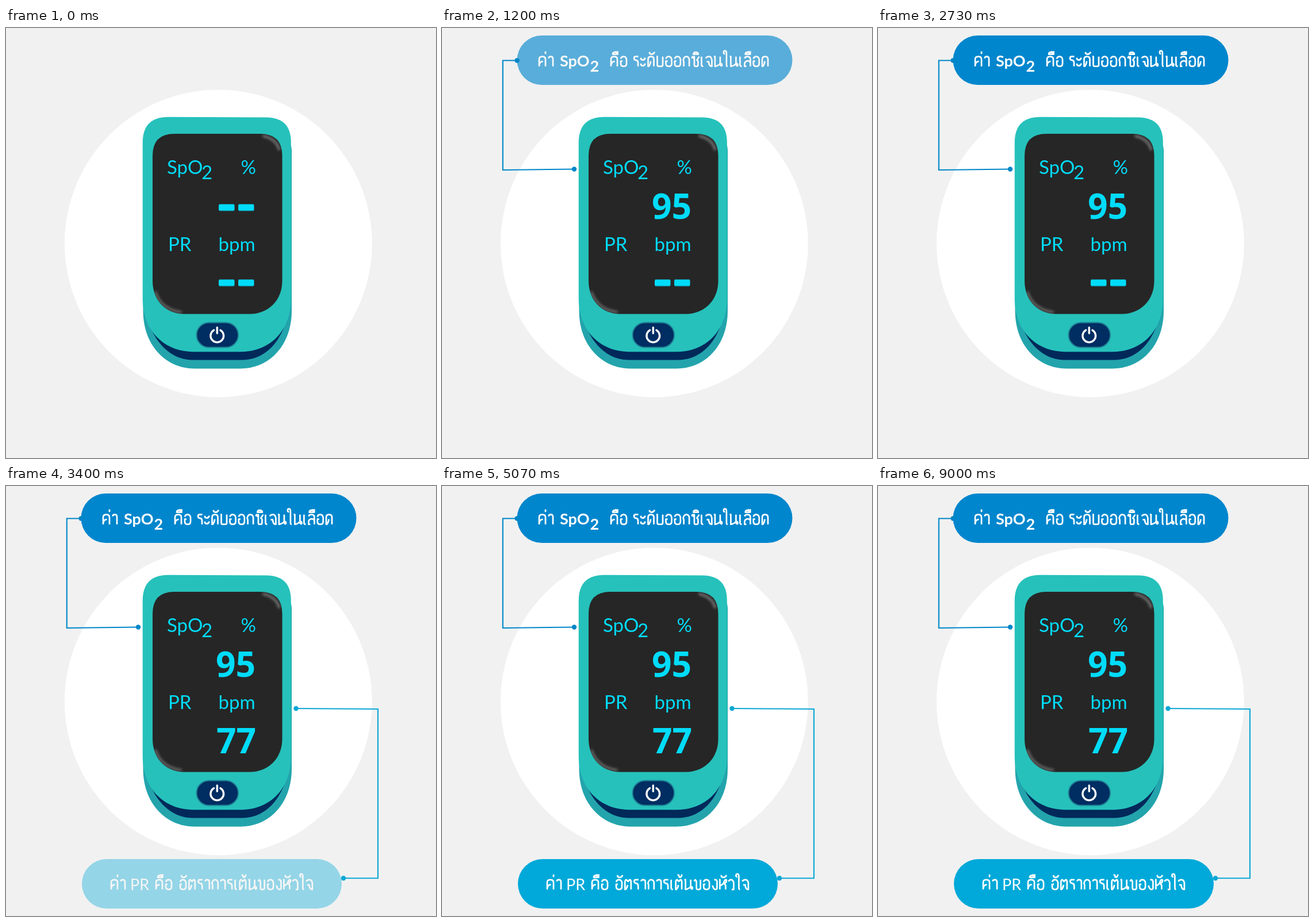
These frames come from a looping animation (748x748 px, 9070 ms). An HTML page:

```html
<!DOCTYPE html>
<html lang="th">
<head>
<meta charset="utf-8">
<title>SpO2</title>
<style>
  html, body { margin: 0; width: 100%; height: 100%; overflow: hidden; background: #f1f1f1; }
  svg { display: block; width: 100vw; height: 100vh; }
  text { font-family: Lato, "Open Sans", sans-serif; }
  .screen { fill: #00dcfa; font-size: 33px; }
  .value { font: 700 60.5px "Open Sans", "Noto Sans", sans-serif; text-anchor: middle; }
  .label { fill: #fff; font-size: 27px; }
  .thai path { fill: none; stroke: #fff; stroke-width: 2.7; stroke-linejoin: round; }
  .wire { fill: none; stroke-width: 2.1; stroke-dasharray: 1 2; }
  .one { --c: #0086c8; }
  .two { --c: #0ca7d5; }
  .wire { stroke: var(--c); }
  .dot { fill: var(--c); }

  [class*="t-"] { animation: 9070ms linear infinite both; }
  .t-dash1 { animation-name: dash1; }
  .t-num1 { animation-name: num1; }
  .t-wire1 { animation-name: wire1; }
  .t-start1 { animation-name: start1; }
  .t-end1 { animation-name: end1; }
  .t-pill1 { animation-name: pill1; }
  .t-dash2 { animation-name: dash2; }
  .t-num2 { animation-name: num2; }
  .t-wire2 { animation-name: wire2; }
  .t-start2 { animation-name: start2; }
  .t-end2 { animation-name: end2; }
  .t-pill2 { animation-name: pill2; }

  @keyframes dash1 { 0%, .77% { opacity: 1 } 3.86%, 100% { opacity: 0 } }
  @keyframes num1 { 0%, .77% { opacity: 0 } 3.86%, 100% { opacity: 1 } }
  @keyframes wire1 { 0%, 4.41% { stroke-dashoffset: 1.01 } 9.92%, 100% { stroke-dashoffset: 0 } }
  @keyframes start1 { 0%, 4.4% { opacity: 0 } 4.41%, 100% { opacity: 1 } }
  @keyframes end1 { 0%, 9.7% { opacity: 0 } 9.92%, 100% { opacity: 1 } }
  @keyframes pill1 { 0%, 9.92% { opacity: 0 } 15.2%, 100% { opacity: 1 } }
  @keyframes dash2 { 0%, 31% { opacity: 1 } 33.5%, 100% { opacity: 0 } }
  @keyframes num2 { 0%, 31% { opacity: 0 } 33.5%, 100% { opacity: 1 } }
  @keyframes wire2 { 0%, 31.97% { stroke-dashoffset: 1.01 } 35.45%, 100% { stroke-dashoffset: 0 } }
  @keyframes start2 { 0%, 31.96% { opacity: 0 } 31.97%, 100% { opacity: 1 } }
  @keyframes end2 { 0%, 35.2% { opacity: 0 } 35.45%, 100% { opacity: 1 } }
  @keyframes pill2 { 0%, 35.45% { opacity: 0 } 40.8%, 100% { opacity: 1 } }
</style>
</head>
<body>
<svg viewBox="0 0 748 748">
  <defs>
    <path id="glass" d="M293 184H442Q480.500 184 480.500 222V440C480.500 474 456 497.500 424 497.500H310C278 497.500 255 474 255 440V222Q255 184 293 184Z"/>
    <clipPath id="inside"><use href="#glass"/></clipPath>
    <filter id="soft" x="-50%" y="-50%" width="200%" height="200%"><feGaussianBlur stdDeviation="2"/></filter>
    <g id="dashes">
      <rect x="370" width="27.5" height="11.5" rx="2.2"/>
      <rect x="404" width="27.5" height="11.5" rx="2.2"/>
    </g>
  </defs>

  <rect width="748" height="748" fill="#f1f1f1"/>
  <circle cx="369.3" cy="374.8" r="267.4" fill="#fff"/>

  <g id="device">
    <path fill="#23a4ac" d="M238.500 300V492C238.500 552 278 592.500 328 592.500H408C458 592.500 497 552 497 492V214Q497 206 494 200L480 190V300Z"/>
    <path fill="#00295a" d="M244 500C258 550 288 577.500 326 577.500H410C448 577.500 478 550 490 500Z"/>
    <path fill="#26c1bb" d="M282 154.800L453 155.500Q495.800 156 495.800 199V470C495.800 528 458 563.300 408 563.300H326C276 563.300 237.700 528 237.700 470V199Q238 155 282 154.800Z"/>
    <use href="#glass" fill="#262626"/>
    <g clip-path="url(#inside)" fill="none" stroke="#777" stroke-width="4" stroke-linecap="round">
      <path filter="url(#soft)" d="M448 188Q470 193 475 211"/>
      <path filter="url(#soft)" stroke="#6a6a6a" d="M260 460Q271 490 304 494"/>
    </g>
    <rect x="331.500" y="512.500" width="72.500" height="43" rx="21.500" fill="#002d62" stroke="#1f8094" stroke-width="2"/>
    <path fill="none" stroke="#fff" stroke-width="3.500" stroke-linecap="round" d="M361.500 525.700A11.300 11.300 0 1 0 373 525.700M367.300 521V531"/>
  </g>

  <g class="screen">
    <text x="280" y="253.500">SpO</text>
    <text x="340" y="263">2</text>
    <text x="408.500" y="253.500">%</text>
    <text x="282" y="388">PR</text>
    <text x="369.500" y="388">bpm</text>
    <use class="t-dash1" href="#dashes" y="306.500"/>
    <use class="t-dash2" href="#dashes" y="437.500"/>
    <text class="value t-num1" x="399.500" y="332">95</text>
    <text class="value t-num2" x="400.500" y="465">77</text>
  </g>

  <g class="t-pill1">
    <rect x="130.500" y="13" width="479" height="86" rx="43" fill="#0086cd"/>
    <g class="thai" data-x="167" data-y="49.700" data-text="ค่า"></g>
    <text class="label" font-weight="700" x="205" y="67">SpO</text>
    <text class="label" font-weight="700" x="257.500" y="76">2</text>
    <g class="thai" data-x="292" data-y="49.700" data-text="คือ"></g>
    <g class="thai" data-x="332" data-y="49.700" data-text="ระดับออกซิเจนในเลือด"></g>
  </g>
  <g class="one">
    <path class="wire t-wire1" pathLength="1" d="M230 245.500L105.800 247V56.500H131"/>
    <circle class="dot t-start1" cx="230" cy="245.500" r="4.200"/>
    <circle class="dot t-end1" cx="130.500" cy="56.500" r="4.200"/>
  </g>

  <g class="t-pill2">
    <rect x="132" y="649" width="452" height="86" rx="43" fill="#00a9d9"/>
    <g class="thai" data-x="181" data-y="684.800" data-text="ค่า"></g>
    <text class="label" x="216" y="702.500">PR</text>
    <g class="thai" data-x="259" data-y="684.800" data-text="คือ"></g>
    <g class="thai" data-x="301" data-y="684.800" data-text="อัตราการเต้นของหัวใจ"></g>
  </g>
  <g class="two">
    <path class="wire t-wire2" pathLength="1" d="M504.500 387L647 388V682.300H587"/>
    <circle class="dot t-start2" cx="504.500" cy="387" r="4.200"/>
    <circle class="dot t-end2" cx="587" cy="682.300" r="4.200"/>
  </g>
</svg>
<script>
  // The listed fonts carry no Thai, so its letters are pen strokes: [advance, path].
  // Vowel and tone marks have no advance and sit over the letter before them.
  const pen = {
    'ก': [15.3, 'M2.5 17V9L1.5 6Q3 0 7 0T12 5V17'],
    'ข': [15.5, 'M1 3L3 0L5 3V14Q5 17 7 17H9.5Q12 17 12 14V0'],
    'ค': [17, 'M2 17V5Q2 0 7.5 0T13 5V17M2 15Q3 8.5 8.5 8.5'],
    'ง': [12.5, 'M5 0H7Q10 0 10 4V14Q10 17 7.5 17Q4 17 2 10'],
    'จ': [14.5, 'M1.5 3Q3 0 7 0T12 6V17Q7 17 6.5 9H3'],
    'ซ': [16, 'M1 3L2.5 0L4 3L5.5 0V14Q5.5 17 7.5 17H9.5Q12 17 12 14V8L10 6L14 0'],
    'ด': [15.5, 'M12 17V5Q12 0 7 0T2 5V17H3Q6 14 6.5 8'],
    'ต': [16, 'M12.5 17V4Q12.5 0 10 0L7.25 3L4.5 0Q2 0 2 5V17H3Q6 14 6.5 9'],
    'น': [17, 'M1 0H3V17Q9 16 12 12V0M12 12Q15.5 12 15 15T11.5 14'],
    'บ': [15.5, 'M1 0H2.5V14Q2.5 17 5 17H9.5Q12 17 12 14V0'],
    'ร': [12.5, 'M9.5 0H5Q2 0 2 3T6 6.5Q9 7 9 11V17'],
    'ล': [15.3, 'M12 17V5Q12 0 7 0Q3 0 2 3M12 10Q9 6 5 8Q2 9 2 13V17H5'],
    'ว': [13.5, 'M1.5 3Q3 0 6 0T10.5 5V17H7'],
    'ห': [16, 'M1 0H2.5V17M2.5 11Q9 8 10 3Q11 0 13 0T13 5Q11 6 9 6.5Q12.5 8 12.5 11V17'],
    'อ': [15.3, 'M2 4Q3 0 7 0T12 5V12Q12 17 7 17T2 12V8H5'],
    'ะ': [12, 'M1.5 2V4Q2 6 5 6T9 2M1.5 12V14Q2 16 5 16T9 12'],
    'า': [12, 'M1.5 3Q2 0 5 0Q9 0 9 4V17'],
    'เ': [8, 'M2 0V14Q2 17 5 17'],
    'ใ': [10.5, 'M8 17Q6 17 6 14V-5Q6 -10 3.5 -10T1 -7Q1 -4.5 3.5 -5'],
    'ิ': [0, 'M-12 -4Q-12 -7.5 -8 -7.5T-3.5 -4Z'],
    'ื': [0, 'M-12 -4Q-12 -7.5 -8 -7.5T-3.5 -4ZM-6.5 -6V-9.5M-3.5 -4V-9.5'],
    'ั': [0, 'M-11 -8V-6Q-10 -4 -7 -4T-2 -8'],
    '่': [0, 'M-4 -9V-4.5'],
    '้': [0, 'M-11 -8Q-8 -9 -8 -4.5H-5L-3 -9']
  };

  for (const line of document.querySelectorAll('.thai')) {
    const { x, y, text } = line.dataset;
    let at = +x;
    line.setAttribute('role', 'img');
    line.setAttribute('aria-label', text);
    for (const letter of text) {
      const [advance, d] = pen[letter];
      const path = document.createElementNS(line.namespaceURI, 'path');
      path.setAttribute('d', d);
      path.setAttribute('transform', `translate(${at} ${y})`);
      line.append(path);
      at += advance;
    }
  }
</script>
</body>
</html>
```
